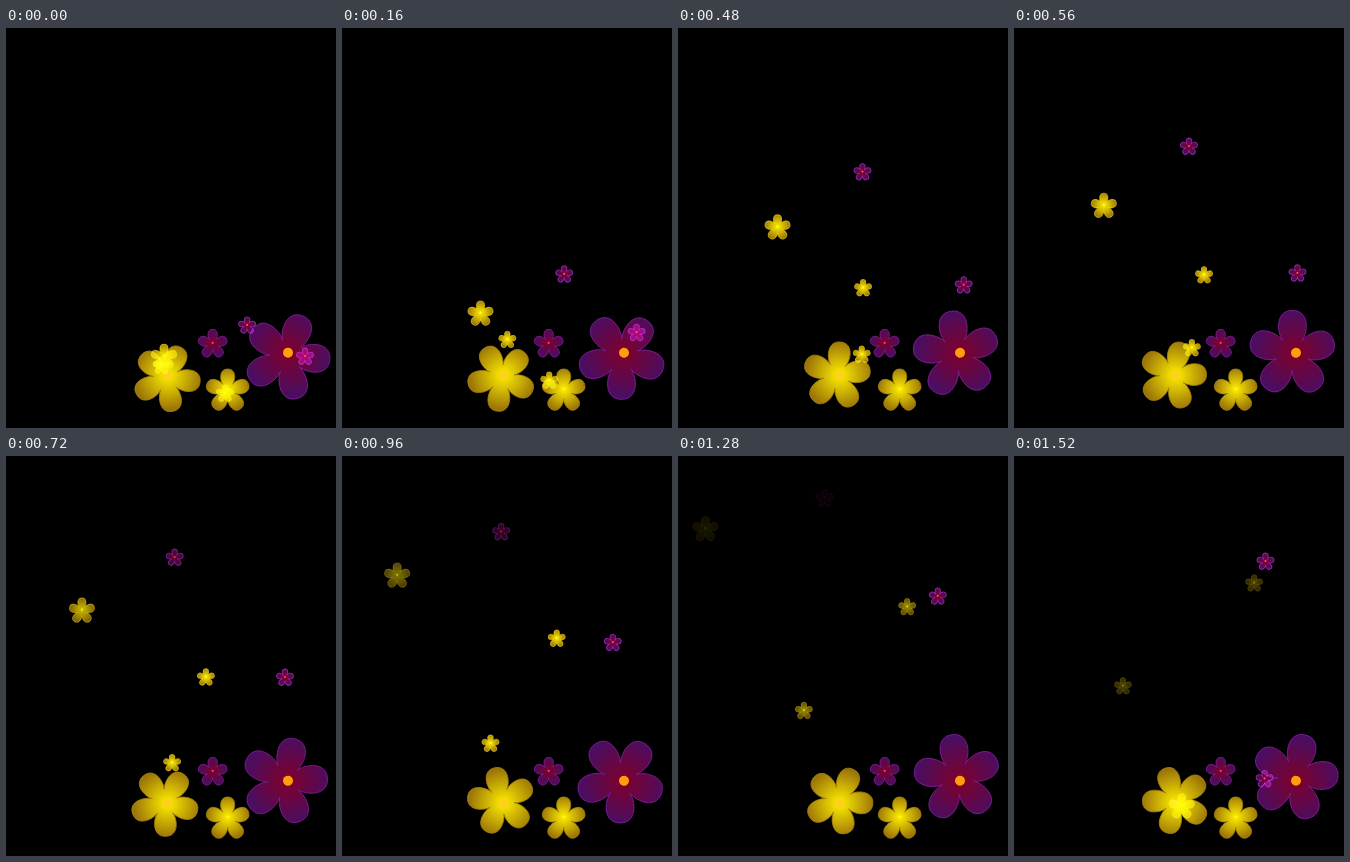
An HTML page with a canvas that plays this animation: 330x400 px, repeating every 1600 ms.

```html
<!DOCTYPE html>
<html lang="en">
<head>
<meta charset="utf-8">
<title>Flowers</title>
<style>
html, body { margin: 0; width: 100%; height: 100%; overflow: hidden; background: #000; }
canvas { display: block; }
</style>
</head>
<body>
<canvas width="330" height="400"></canvas>
<script>
const ctx = document.querySelector('canvas').getContext('2d');
const STEP = 80, STEPS = 20, FADE = 10, TAU = Math.PI * 2;

const purple = { inner: '#80002a', outer: '#4a0e62', edge: '#80209a', dot: '#ff9d0a', smallDot: '#ff4a60' };
const yellow = { inner: '#fff000', outer: '#9c7608', edge: '#a5820c', dot: '#ffd21a', smallDot: '#ffff30' };

// Five-petal outline of radius 1, hanging slightly below its pivot.
const outline = new Path2D();
for (let i = 0; i < 5; i++) {
  const a = (i / 5 - 0.25) * TAU, c = Math.cos(a), s = Math.sin(a);
  const at = (x, y) => [x * c - y * s, x * s + y * c + 0.09];
  outline.lineTo(...at(0.307, -0.223));
  outline.bezierCurveTo(...at(0.5, -0.36), ...at(1, -0.4), ...at(1, 0));
  outline.bezierCurveTo(...at(1, 0.4), ...at(0.5, 0.36), ...at(0.307, 0.223));
}
outline.closePath();

function flower(colors, x, y, size, degrees = 0) {
  const big = size > 30;
  ctx.save();
  ctx.translate(x, y);
  ctx.rotate(degrees * TAU / 360);
  ctx.scale(size, size);
  const fill = ctx.createRadialGradient(0, 0, 0, 0, 0, 1);
  fill.addColorStop(0, colors.inner);
  fill.addColorStop(1, colors.outer);
  ctx.fillStyle = fill;
  ctx.fill(outline);
  ctx.strokeStyle = colors.edge;
  ctx.lineWidth = 0.8 / size;
  ctx.stroke(outline);
  ctx.beginPath();
  ctx.arc(0, 0, (big ? 5 : 1.1) / size, 0, TAU);
  ctx.fillStyle = big ? colors.dot : colors.smallDot;
  ctx.fill();
  ctx.restore();
}

// Each drifter rises from one point, bends at the knee step and heads for a third point.
const drifters = [
  { colors: yellow, size: 13, birth: -2, knee: 7, from: [177.5, 371], via: [89.8, 177], to: [20.5, 60.5], fades: true },
  { colors: purple, size: 8.8, birth: -2, knee: 7, from: [260, 348], via: [175, 118], to: [143.4, 33], fades: true },
  { colors: yellow, size: 8.8, birth: 0, knee: 12, from: [155.5, 337], via: [214.7, 182], to: [251, 103], fades: true },
  { colors: yellow, size: 8.8, birth: 0, knee: 12, from: [219, 365], via: [148.5, 287], to: [92, 205], fades: true },
  { colors: purple, size: 8.8, birth: 0, knee: 9, from: [299, 328], via: [279, 221], to: [251.5, 105] },
];

function drift({ colors, size, birth, knee, from, via, to, fades }, step) {
  const t = step >= STEPS + birth ? step - STEPS : step;
  const late = (t - knee) / FADE;
  const [a, b, p] = late < 0 ? [from, via, (t - birth) / (knee - birth)] : [via, to, late];
  ctx.globalAlpha = fades ? Math.min(1, Math.max(0, 1 - late)) : 1;
  flower(colors, a[0] + (b[0] - a[0]) * p, a[1] + (b[1] - a[1]) * p, size);
}

function draw(now) {
  const step = Math.floor(now / STEP) % STEPS;
  ctx.globalAlpha = 1;
  ctx.globalCompositeOperation = 'source-over';
  ctx.fillStyle = '#000';
  ctx.fillRect(0, 0, 330, 400);
  flower(purple, 282, 324.7, 43.5, 22 + 7.2 * step);
  flower(yellow, 161.6, 347.2, 34, 25 + 9 * step);
  flower(yellow, 221.7, 361, 22);
  flower(purple, 206.7, 314.8, 14.8);
  ctx.globalCompositeOperation = 'screen';
  for (const d of drifters) drift(d, step);
}

const begin = performance.now();
function frame() {
  draw(performance.now() - begin);
  requestAnimationFrame(frame);
}
frame();
</script>
</body>
</html>
```
